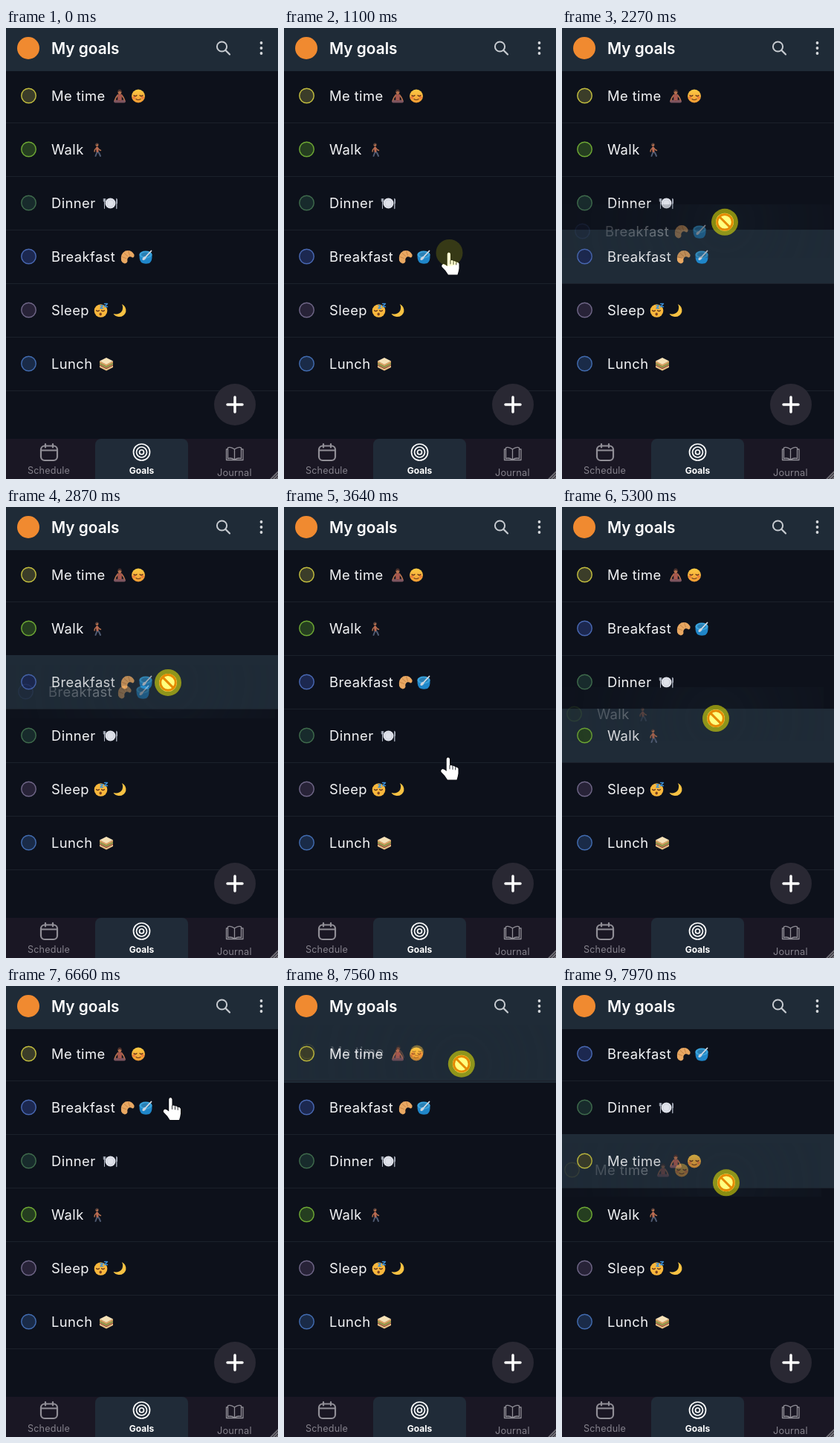
Animation, 366 px wide and 606 px high, one loop 8 s. Source, as an HTML page with a canvas:

```html
<!DOCTYPE html>
<html lang="en">
<head>
<meta charset="utf-8">
<title>My goals</title>
<style>
html, body { margin: 0; width: 100%; height: 100%; overflow: hidden; background: #0d111b; }
canvas { display: block; width: 366px; height: 606px; }
</style>
</head>
<body>
<canvas id="stage" width="366" height="606"></canvas>
<script>
const W = 366, H = 606, LOOP = 8000, ROW = 72, TOP = 55;
const FONT = 'Inter, "Open Sans", sans-serif';
const PANEL = '#1f2b37';
const stage = document.getElementById('stage').getContext('2d');
const ghostCanvas = document.createElement('canvas');
ghostCanvas.width = W;
ghostCanvas.height = ROW;
const ghost = ghostCanvas.getContext('2d');

// ---- drawing helpers ----
function disc(c, x, y, rx, fill, ry = rx, turn = 0) {
  c.beginPath();
  c.ellipse(x, y, rx, ry, turn, 0, Math.PI * 2);
  c.fillStyle = fill;
  c.fill();
}
function ring(c, x, y, r, color, width) {
  c.beginPath();
  c.arc(x, y, r, 0, Math.PI * 2);
  c.strokeStyle = color;
  c.lineWidth = width;
  c.stroke();
}
function shape(c, d, fill) {
  c.fillStyle = fill;
  c.fill(new Path2D(d));
}
function line(c, d, color, width) {
  c.strokeStyle = color;
  c.lineWidth = width;
  c.lineCap = c.lineJoin = 'round';
  c.stroke(new Path2D(d));
}
function text(c, s, x, y, size, weight, color, align = 'left', gap = 0) {
  c.font = `${weight} ${size}px ${FONT}`;
  c.letterSpacing = gap + 'px';
  c.textAlign = align;
  c.fillStyle = color;
  c.fillText(s, x, y);
}

// ---- emoji, each drawn around its own centre ----
const emoji = {
  meditate(c) {
    shape(c, 'M-8 7Q-8 4.5 -4 5L0 6L4 5Q8 4.5 8 7Q8 9 5 9H-5Q-8 9 -8 7Z', '#7d5560');
    line(c, 'M-2.5 -1.5L-5 2L-6.5 5.5M2.5 -1.5L5 2L6.5 5.5', '#b5714e', 1.8);
    shape(c, 'M-3 -2Q0 -3 3 -2L2.6 6H-2.6Z', '#a8584f');
    disc(c, 0, -5.2, 2.4, '#b5714e', 3);
    shape(c, 'M-2.6 -5Q-3 -9 0 -9Q3 -9 2.6 -5Q0 -8 -2.6 -5Z', '#4a302c');
  },
  calm(c) {
    const glow = c.createLinearGradient(0, -9, 0, 9);
    glow.addColorStop(0, '#fccb45');
    glow.addColorStop(1, '#f39a32');
    disc(c, 0, 0, 9, glow);
    disc(c, -5.8, 2, 2, '#ee7f3c');
    disc(c, 5.8, 2, 2, '#ee7f3c');
    line(c, 'M-6 -1Q-4 1 -2 -1M2 -1Q4 1 6 -1M-3 4Q0 6 3 4', '#6b3a1c', 1.2);
  },
  walk(c) {
    line(c, 'M0 2L-2.5 8.5M0 2L2.5 5L4 8.5', '#4f5a72', 2);
    line(c, 'M-.5 -3L-3.5 0L-4 2.5M0 -3L2.5 0L4.5 1', '#b5714e', 1.4);
    line(c, 'M-.5 -2.5L0 2', '#bd6a52', 3);
    disc(c, -.5, -6.5, 2, '#b5714e');
    shape(c, 'M-2.8 -5Q-3 -9 -.5 -9Q1.5 -9 1.5 -7.5L-.8 -7Z', '#55403c');
  },
  plate(c) {
    disc(c, 0, 0, 7, '#dfe2ea');
    ring(c, 0, 0, 4.6, '#c9cdd8', .8);
    line(c, 'M-8 -6V7M-9.2 -6V-2.5H-6.8V-6', '#aeb4c1', 1);
    line(c, 'M8.3 -6V7M8.8 -5V0', '#aeb4c1', 1.3);
  },
  croissant(c) {
    shape(c, 'M-8.5 5Q-10 -4 -3 -8Q5 -10 9 -3Q9.5 1 6.5 1Q4 -1 2 0Q-1 2 0 6Q-1 9 -4 9Q-7.5 8 -8.5 5Z', '#e9a862');
    line(c, 'M-7.5 0L-2 2M-4.5 -5L0 -1M1 -7.5L3 -2', '#c98545', 1);
  },
  bowl(c) {
    shape(c, 'M-8.5 -3Q-9 7 -4 8.5Q0 9.8 5 8.5Q9 6 8.5 -3Z', '#1f86c9');
    disc(c, 0, -3, 8.6, '#3aa4dd', 5);
    disc(c, 0, -3, 6, '#2a7fb4', 3.2);
    line(c, 'M-1 1L7.5 -8', '#d9dee6', 1.8);
    disc(c, -2, 2, 3, '#c9d3de', 1.8, -.8);
  },
  asleep(c) {
    disc(c, -.5, .5, 8.8, '#f9b73c');
    line(c, 'M-6.5 0Q-4.5 2 -2.5 0M.5 0Q2.5 2 4.5 0', '#6b3a1c', 1.2);
    disc(c, -.8, 5, 1.7, '#7c4320', 1.9);
    line(c, 'M-1 -6.5H2.5L-1 -3H2.5M4.5 -9H8.5L4.5 -5H8.5', '#3b8fd6', 1.4);
  },
  moon(c) {
    shape(c, 'M3 -8.5Q9.5 -5 8.3 2Q6 9 -1.5 8.6Q-6.5 8 -8.5 4.5Q-1 6 2.5 1.5Q5.5 -3 3 -8.5Z', '#f6c243');
  },
  sandwich(c) {
    shape(c, 'M-9 2L0 6.5L9 2V4.5L0 9L-9 4.5Z', '#e8c084');
    shape(c, 'M-9 0L0 4.5L9 0V2L0 6.5L-9 2Z', '#b9604a');
    shape(c, 'M-9 -1.5L0 3L9 -1.5V.5L0 5L-9 .5Z', '#8fa64c');
    shape(c, 'M-9 -4L0 0L9 -4V-1.5L0 3L-9 -1.5Z', '#d9a262');
    shape(c, 'M-9 -4L0 -8.5L9 -4L0 .5Z', '#f6e2b8');
  }
};

// name, ring colour, fill colour, [emoji, x] pairs
const goals = {
  me: ['Me time', '#c2bd3e', '#3b3d29', ['meditate', 153], ['calm', 178]],
  walk: ['Walk', '#6ea834', '#253e20', ['walk', 123]],
  dinner: ['Dinner', '#3f6b4c', '#182b2c', ['plate', 140.5]],
  breakfast: ['Breakfast', '#4968b2', '#1c2850', ['croissant', 163.5], ['bowl', 188]],
  sleep: ['Sleep', '#6f6687', '#282338', ['asleep', 128], ['moon', 153]],
  lunch: ['Lunch', '#426cb0', '#1a2b48', ['sandwich', 135]]
};

function goal(c, key, mid) {
  const [name, edge, fill, ...icons] = goals[key];
  disc(c, 30.5, mid, 10, fill);
  ring(c, 30.5, mid, 9.75, edge, 1.4);
  text(c, name, 61, mid + 7, 18.4, 400, '#f3f4f6', 'left', .4);
  for (const [icon, x] of icons) {
    c.save();
    c.translate(x, mid + .5);
    emoji[icon](c);
    c.restore();
  }
}

// ---- pointer path: time, x, y ----
const path = [
  [170, 304, 608], [420, 216, 440], [560, 178, 345], [760, 200, 296], [970, 222.5, 302],
  [1969, 222.5, 302], [1970, 222.5, 301], [2140, 222.5, 301], [2270, 219, 261],
  [2480, 217, 230], [2900, 218, 236], [2950, 218, 236], [3250, 220, 300], [3580, 221.5, 338],
  [3640, 221.5, 337], [3760, 221.5, 330], [4060, 222, 167], [4800, 222, 167],
  [4990, 211, 204], [5300, 207, 284], [5590, 207, 300], [5620, 207, 300],
  [5900, 214, 365], [6100, 220, 380], [6410, 221, 351], [6660, 222, 151],
  [6770, 239, 103], [7530, 239, 103], [7970, 221, 264], [8000, 220, 271]
];

function slope(i, k) {
  if (i < 1 || i > path.length - 2) return 0;
  const rate = j => (path[j + 1][k] - path[j][k]) / (path[j + 1][0] - path[j][0]);
  const a = rate(i - 1), b = rate(i);
  return a * b > 0 ? 2 * a * b / (a + b) : 0;
}

// Monotone cubic through the path points
function pointer(t) {
  if (t <= path[0][0]) return path[0].slice(1);
  let i = 0;
  while (i < path.length - 2 && path[i + 1][0] <= t) i++;
  const p = path[i], q = path[i + 1], d = q[0] - p[0];
  const u = (t - p[0]) / d, v = 1 - u;
  return [1, 2].map(k =>
    p[k] * (1 + 2 * u) * v * v + q[k] * (3 - 2 * u) * u * u +
    d * (slope(i, k) * u * v * v - slope(i + 1, k) * u * u * v));
}

// ---- drags; home is the row the item is picked up from ----
const drags = [
  { key: 'breakfast', home: 3, press: 1000, start: 2155, end: 2935, grab: [222, 295], dir: -1 },
  { key: 'walk', home: 1, press: 4070, start: 4825, end: 5610, grab: [221, 169], dir: 1 },
  { key: 'me', home: 0, press: 6770, start: 7545, end: 8001, grab: [238, 108], dir: 1 }
];

function place(order, drag, y) {
  const slot = Math.floor((y - 12 * drag.dir - TOP) / ROW);
  const rest = order.filter(k => k !== drag.key);
  rest.splice(slot, 0, drag.key);
  return rest;
}

function listAt(t) {
  let order = Object.keys(goals), active = null;
  for (const d of drags) {
    if (t < d.start) break;
    order = place(order, d, pointer(Math.min(t, d.end))[1]);
    if (t < d.end) active = d;
  }
  return { order, active };
}

function pressure(t) {
  let level = 0;
  for (const d of drags) {
    if (t >= d.press) level = Math.min(1, (t - d.press) / 300, 1 - (t - d.end) / 200);
  }
  return Math.max(0, level);
}

// ---- parts of the screen ----
function drawHeader(c) {
  c.fillStyle = PANEL;
  c.fillRect(0, 0, W, 58);
  disc(c, 30, 27, 15, '#f08a30');
  text(c, 'My goals', 61, 35, 20.8, 600, '#fff');
  ring(c, 290.5, 25, 6.6, '#c8ccd1', 2);
  line(c, 'M295.5 30L301 35.5', '#c8ccd1', 2.2);
  for (const y of [20, 27, 34]) disc(c, 343.5, y, 1.9, '#d5d8dc');
}

function drawList(c, order, active) {
  order.forEach((key, i) => {
    const y = TOP + i * ROW;
    if (active && active.key === key) {
      c.fillStyle = PANEL;
      c.fillRect(0, Math.max(58, y), W, ROW);
    }
    c.fillStyle = '#1b212b';
    c.fillRect(0, y + ROW, W, 1);
    goal(c, key, y + 36);
  });
}

function drawFooter(c) {
  disc(c, 308, 506, 28, '#292833');
  line(c, 'M298 506H318M308 496V516', '#fff', 3.5);
  c.fillStyle = '#1a1724';
  c.fillRect(0, 552, W, 54);
  c.fillStyle = '#202b38';
  c.beginPath();
  c.roundRect(120, 552, 125, 54, [8, 8, 0, 0]);
  c.fill();
  const grey = '#85828c', icon = '#918f97';
  c.beginPath();
  c.roundRect(47, 561.5, 22, 19.5, 5);
  c.strokeStyle = icon;
  c.lineWidth = 2.2;
  c.stroke();
  line(c, 'M48 567.5H68M53 559V563.5M63 559V563.5', icon, 2.2);
  for (const r of [11, 7, 3]) ring(c, 182.5, 570, r, '#fff', 1.7);
  line(c, 'M307.5 566Q302 562 298.5 564V578.5Q303 577 307.5 580Q312 577 316.5 578.5V564Q313 562 307.5 566V580M298 566H296.5V580.5H319V566H317', icon, 1.3);
  text(c, 'Schedule', 57.5, 599, 12.6, 400, grey, 'center', .2);
  text(c, 'Goals', 182.5, 599, 12, 700, '#fff', 'center');
  text(c, 'Journal', 307.3, 601.5, 12.8, 400, grey, 'center', .2);
  shape(c, 'M355 606L366 595V606Z', '#6f6d74');
  line(c, 'M358 606L366 598M362 606L366 602', '#2a2833', 1);
}

function drawGhost(c, drag, x, y) {
  const [gx, gy] = drag.grab, top = drag.home * ROW + TOP;
  ghost.clearRect(0, 0, W, ROW);
  ghost.globalCompositeOperation = 'source-over';
  ghost.fillStyle = 'rgba(31,43,55,.5)';
  ghost.fillRect(0, 0, W, ROW);
  goal(ghost, drag.key, 36);
  const fade = ghost.createRadialGradient(gx, gy - top, 0, gx, gy - top, 270);
  fade.addColorStop(0, 'rgba(0,0,0,.62)');
  fade.addColorStop(.37, 'rgba(0,0,0,.33)');
  fade.addColorStop(.6, 'rgba(0,0,0,.2)');
  fade.addColorStop(1, 'rgba(0,0,0,0)');
  ghost.globalCompositeOperation = 'destination-in';
  ghost.fillStyle = fade;
  ghost.fillRect(0, 0, W, ROW);
  c.drawImage(ghostCanvas, Math.round(x - gx), Math.round(top + y - gy));
}

function drawCursor(c, x, y, dragging, level) {
  c.save();
  c.translate(x, y);
  if (dragging) {
    disc(c, 0, 0, 12, '#fff');
    ring(c, 0, 0, 10.3, '#cc1400', 3);
    line(c, 'M-6.5 -6.5L6.5 6.5', '#cc1400', 3);
  } else {
    c.translate(-.5, 0);
    const hand = 'M-2.3 2Q-2.3 -.5 -.2 -.5Q2 -.5 2 2V10.5Q4 9.5 6 11Q8 10.5 9.5 12.5Q12 12 13.5 14.5V21Q13 25 11.5 29.5H-1Q-4 24 -9.5 19Q-10.5 16 -7.5 15Q-5 15.5 -2.3 18Z';
    line(c, hand, '#05070c', 1.5);
    shape(c, hand, '#fff');
    line(c, 'M2 10.5V15M6 11.5V15.5M9.7 13V16', '#11141b', .9);
  }
  c.restore();
  if (level > 0) disc(c, x, y, 18, `rgba(255,255,0,${.5 * level})`);
}

function draw(t) {
  const c = stage, [x, y] = pointer(t), { order, active } = listAt(t);
  c.fillStyle = '#0d111b';
  c.fillRect(0, 0, W, H);
  drawList(c, order, active);
  drawHeader(c);
  drawFooter(c);
  if (active) drawGhost(c, active, x, y);
  if (t >= 170) drawCursor(c, x, y, !!active, pressure(t));
}

const began = performance.now();
function tick() {
  draw((performance.now() - began) % LOOP);
  requestAnimationFrame(tick);
}
tick();
</script>
</body>
</html>
```
